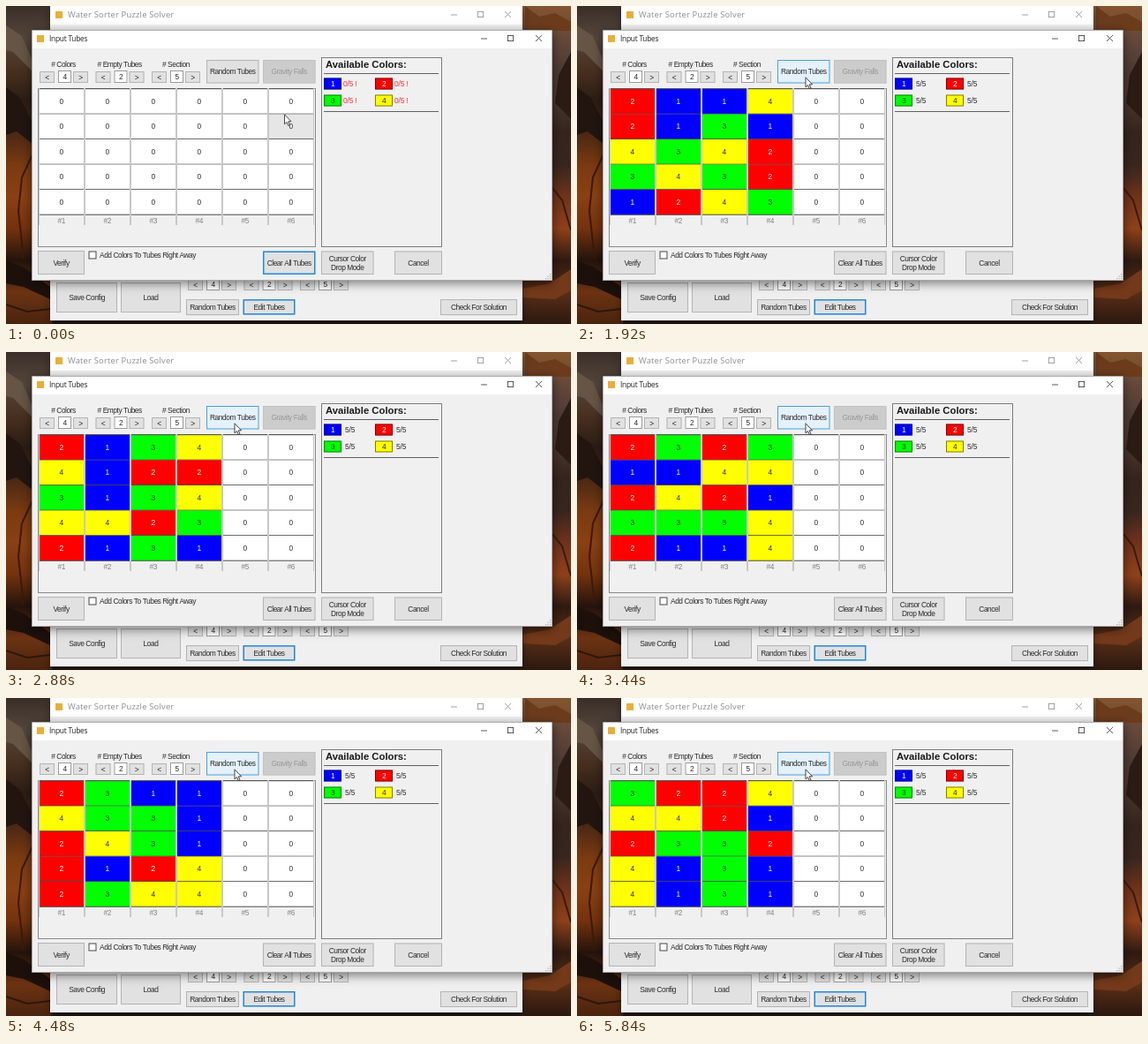
These frames come from a looping animation (640 by 360 pixels, 5.92 s). An HTML page with a canvas:

```html
<!DOCTYPE html>
<html lang="en">
<head>
<meta charset="utf-8">
<title>Input Tubes</title>
<style>
html, body { margin: 0; width: 100%; height: 100%; overflow: hidden; background: #22150f; }
canvas { display: block; }
</style>
</head>
<body>
<canvas id="stage" width="640" height="360"></canvas>
<script>
const g = document.getElementById('stage').getContext('2d');
const LOOP = 5920, FIRST_FILL = 1840, FILL_STEP = 800, PRESS = 120;
const SANS = '"Liberation Sans", Arial, sans-serif';
const UI = '"Open Sans", "Noto Sans", sans-serif';
const COLORS = ['#fff', '#00f', '#f00', '#0f0', '#ff0'];
const INK = ['#333', '#fff', '#fff', '#143c14', '#333300'];

// One digit per tube, one group per row from the top
const BOARDS = [
  '2114 2131 4342 3432 1243',
  '2134 4122 3134 4423 2131',
  '2323 1144 2421 3334 2114',
  '2311 4331 2431 2124 2344',
  '3224 4421 2332 4131 4131'
].map(board => board.split(' '));

function rect(x, y, w, h, fill, edge, line = 1) {
  if (fill) { g.fillStyle = fill; g.fillRect(x, y, w, h); }
  if (edge) {
    g.strokeStyle = edge;
    g.lineWidth = line;
    g.strokeRect(x + line / 2, y + line / 2, w - line, h - line);
  }
}

function text(s, x, y, { color = '#2a2a2a', size = 8.4, align = 'center', font = SANS, gap = -0.45, weight = 400 } = {}) {
  g.font = `${weight} ${size}px ${font}`;
  g.letterSpacing = gap + 'px';
  g.textAlign = align;
  g.fillStyle = color;
  g.fillText(s, x, y + size * 0.36);
}

function path(points, fill, stroke, width = 1) {
  g.beginPath();
  for (let i = 0; i < points.length; i += 2) g.lineTo(points[i], points[i + 1]);
  if (fill) { g.closePath(); g.fillStyle = fill; g.fill(); }
  if (stroke) { g.strokeStyle = stroke; g.lineWidth = width; g.stroke(); }
}

const BUTTON = {
  normal: ['#e1e1e1', '#b4b4b4', 1],
  focus: ['#e1e1e1', '#2288dc', 1.5],
  hover: ['#e5f1fb', '#4a9fe3', 1],
  press: ['#cce4f7', '#4a88bc', 1],
  off: ['#cccccc', '#c2c2c2', 1]
};

function button(label, x, y, w, h, state = 'normal') {
  rect(x, y, w, h, ...BUTTON[state]);
  const lines = label.split('\n');
  lines.forEach((s, i) => text(s, x + w / 2, y + h / 2 + (i - (lines.length - 1) / 2) * 9.5,
    { color: state === 'off' ? '#999' : '#2a2a2a' }));
}

function spinner(x, y, value) {
  button('<', x, y, 17, 13);
  rect(x + 21, y - 1, 15, 14, '#fff', '#9a9a9a');
  text(value, x + 28.5, y + 6);
  button('>', x + 38, y, 17, 13);
}

function titleBar(x, y, w, title, color, opt) {
  rect(x, y, w, 21, '#fff');
  rect(x + 6, y + 6, 8, 8, '#e9ae3a');
  text(title, x + 20, y + 10, { color, align: 'left', font: UI, ...opt });
}

function windowKeys(xs, y, color) {
  const [min, max, close] = xs;
  path([min, y + 4, min + 7, y + 4], null, color, 0.8);
  rect(max, y, 7, 7, null, color, 0.8);
  path([close, y, close + 7, y + 7], null, color, 0.8);
  path([close + 7, y, close, y + 7], null, color, 0.8);
}

function frameWindow(x, y, w, h, blur, fade) {
  g.save();
  g.shadowColor = `rgba(0,0,0,${fade})`;
  g.shadowBlur = blur;
  g.shadowOffsetY = 3;
  rect(x, y, w, h, '#f0f0f0');
  g.restore();
}

function strip(x, w, colors) {
  const grad = g.createLinearGradient(0, 0, 0, 360);
  colors.forEach((c, i) => grad.addColorStop(i / (colors.length - 1), c));
  rect(x, 0, w, 360, grad);
}

function wallpaper() {
  rect(0, 0, 640, 360, '#22150f');
  strip(0, 52, ['#3a2e28', '#54463c', '#48301f', '#2b1c14', '#4a2814', '#7a3a10', '#8a4012', '#74320d', '#24130c', '#6c3312', '#4a230f']);
  strip(582, 58, ['#84552f', '#66483a', '#4c3b34', '#4a362c', '#33241e', '#38261e', '#70321a', '#8f401a', '#2e1a11', '#5a2e16', '#2b1810']);
  path([0, 22, 18, 34, 30, 62, 30, 74, 8, 52, 0, 50], '#665444');
  path([0, 92, 16, 104, 30, 132, 30, 156, 12, 142, 0, 146], '#22150f');
  path([30, 168, 18, 194, 14, 232, 20, 286], null, '#3a1a0a', 2);
  path([0, 288, 20, 296, 50, 318, 50, 332, 20, 318, 0, 314], '#1d100b');
  path([0, 338, 24, 346, 50, 343], null, '#2d160b', 2);
  path([588, 0, 604, 12, 622, 8, 640, 18, 640, 28, 588, 28], '#6b3b1c');
  path([640, 52, 626, 78, 622, 110, 640, 128], '#2a1c15');
  path([619, 206, 630, 220, 640, 254], null, '#3a1a0d', 2);
  path([640, 298, 616, 314, 586, 320, 586, 330, 622, 332, 640, 322], '#74391a');
}

function backWindow() {
  frameWindow(50, 0, 535, 356, 8, 0.4);
  titleBar(50, 0, 535, 'Water Sorter Puzzle Solver', '#8c8c8c', { size: 9.4, gap: 0.2 });
  windowKeys([504, 534, 565], 6, '#8c8c8c');
  [4, 2, 5].forEach((n, i) => spinner(206 + i * 63.5, 309, n));
  button('Save Config', 57, 313, 69, 34);
  button('Load', 130, 313, 68, 34);
  button('Random Tubes', 204, 332, 60, 18);
  button('Edit Tubes', 268.5, 332, 59, 17.5, 'focus');
  button('Check For Solution', 492, 332, 87, 18);
}

const inside = (p, x, y, w, h) => p.x >= x && p.x < x + w && p.y >= y && p.y < y + h;

function tubes(board, mouse) {
  rect(36, 93, 315, 180, null, '#8a8a8a');
  for (let c = 0; c < 6; c++) {
    const x = 38 + c * 52;
    for (let r = 0; r < 5; r++) {
      const y = 94 + r * 28.5;
      const n = board && c < 4 ? +board[r][c] : 0;
      const over = !n && inside(mouse, x, y, 51, 28.5);
      rect(x, y, 50, 28.5, over ? '#e6e6e6' : COLORS[n]);
      path([x, y + 28.2, x + 50, y + 28.2], null, '#4a4a4a');
      text(n, x + 24.7, y + 13.6, { color: INK[n] });
    }
    path([x, 93.7, x + 50, 93.7], null, '#4a4a4a');
    path([x - 0.5, 93, x - 0.5, 248], null, '#c8c8c8');
    path([x + 50.5, 93, x + 50.5, 248], null, '#c8c8c8');
    text('#' + (c + 1), x + 24.7, 243, { color: '#808080' });
  }
}

function palette(filled) {
  rect(357, 58, 137, 215, null, '#7c7c7c');
  text('Available Colors:', 362, 65.5, { size: 11.3, align: 'left', color: '#1a1a1a', gap: 0, weight: 700 });
  for (const y of [76.5, 119.5]) path([360, y, 490, y], null, '#606060');
  for (let n = 1; n < 5; n++) {
    const x = n % 2 ? 360 : 418, y = n < 3 ? 81.5 : 100.5;
    rect(x, y, 20, 13, COLORS[n], 'rgba(0,0,0,.5)');
    text(n, x + 10, y + 6.5, { color: INK[n] });
    text(filled ? '5/5' : '0/5 !', x + (filled ? 24 : 22), y + 6.5,
      { align: 'left', gap: -0.1, color: filled ? '#2a2a2a' : '#f83030' });
  }
}

function inputWindow(t, mouse) {
  const fill = Math.min(4, Math.floor((t - FIRST_FILL) / FILL_STEP));
  const board = BOARDS[fill];
  const next = FIRST_FILL + (fill + 1) * FILL_STEP;
  const pressed = fill < 4 && t >= FIRST_FILL - PRESS && t >= next - PRESS;
  const hover = inside(mouse, 227, 61, 60, 27);

  frameWindow(29, 27, 590, 284, 11, 0.5);
  titleBar(29, 27, 590, 'Input Tubes', '#222', { size: 8.4, gap: -0.25 });
  windowKeys([538, 568, 600], 33, '#333');
  rect(29, 27, 590, 284, null, '#777', 0.6);

  [['# Colors', 4], ['# Empty Tubes', 2], ['# Section', 5]].forEach(([label, n], i) => {
    text(label, 65 + i * 63.7, 66);
    spinner(38 + i * 63.5, 74, n);
  });
  button('Random Tubes', 227, 61, 59.5, 26.5, pressed ? 'press' : hover ? 'hover' : 'normal');
  button('Gravity Falls', 291, 61, 59.5, 26.5, 'off');
  tubes(board, mouse);
  palette(Boolean(board));

  button('Verify', 36, 277, 53, 27);
  rect(93.5, 277.5, 9, 9, '#fff', '#444');
  text('Add Colors To Tubes Right Away', 106, 282, { align: 'left' });
  button('Clear All Tubes', 291, 277.5, 59.5, 26.5, t < FIRST_FILL - PRESS ? 'focus' : 'normal');
  button('Cursor Color\nDrop Mode', 357, 277.5, 59.5, 26.5);
  button('Cancel', 440, 277.5, 54, 26.5);
  for (let i = 0; i < 3; i++)
    for (let j = 0; j <= i; j++) rect(616 - j * 2.5, 303 + i * 2.5, 1.2, 1.2, '#aaa');
}

function pointer({ x, y }) {
  const shape = [0, 0, 0, 11, 2.5, 8.7, 4.3, 12.7, 6, 12, 4.2, 8, 7.6, 8];
  path(shape.map((v, i) => v + (i % 2 ? y : x)), '#fff', '#333', 0.9);
}

function mouseAt(t) {
  const u = Math.min(1, Math.max(0, (t - 80) / 520));
  const e = u * u * (3 - 2 * u);
  return { x: 315.5 - 56.5 * e, y: 122.8 - 42 * e };
}

function draw(now) {
  const t = now % LOOP;
  const mouse = mouseAt(t);
  wallpaper();
  backWindow();
  inputWindow(t, mouse);
  pointer(mouse);
  requestAnimationFrame(() => draw(performance.now() - start));
}

const start = performance.now();
draw(0);
</script>
</body>
</html>
```
